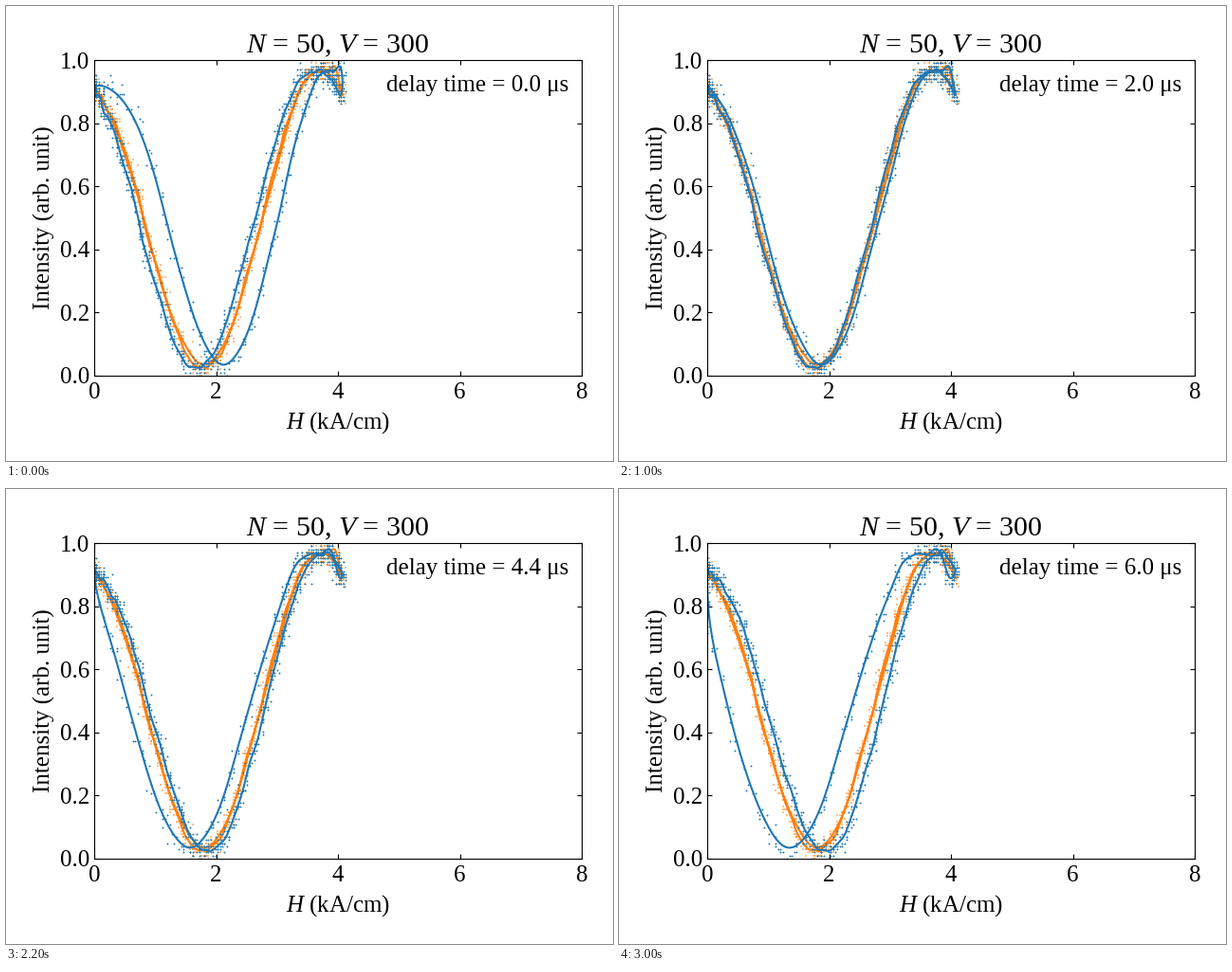
Recreate the animation shown at these times as a matplotlib script. Size 640 by 480 pixels, loop 3100 ms.

```python
import numpy as np
import matplotlib.pyplot as plt
from matplotlib.animation import FuncAnimation

W, H, DPI = 640, 480, 100
FRAMES, INTERVAL = 31, 100
DT = 0.2            # sampling step and delay step, in microseconds
MATCHED = 13        # delay step at which both branches coincide
H_MAX = 4.08
BLUE, ORANGE = "#1f77b4", "#ff7f0e"

plt.rcParams.update({
    "font.family": "Liberation Serif",
    "font.size": 18,
    "mathtext.fontset": "custom",
    "mathtext.rm": "Liberation Serif",
    "mathtext.it": "Liberation Serif:italic",
    "xtick.direction": "in",
    "ytick.direction": "in",
    "xtick.top": True,
    "ytick.right": True,
    "xtick.major.pad": 5.2,
})


def intensity(h):
    """Light through the cell: a squared sine around the dark field."""
    return .022 + (.885 + .017 * h) * np.sin(.83 * (h - 1.8)) ** 2


def crest(h):
    """Extra peak near the maximum, on the rising branch only."""
    return .065 * np.exp(-((h - 3.96) / .06) ** 2)


def rise_rate(h):
    """Fast capacitor discharge with a softened start."""
    return .012 + .155 * np.sqrt(1 - h / H_MAX) * (1 - .35 * np.exp(-h / .3))


def fall_rate(h):
    return .013 + .033 * np.clip(np.sin(np.pi * h / H_MAX), 0, 1) ** .6


def sweep(rate):
    """Field samples from 0 to the maximum at the given rate."""
    h = np.linspace(0, H_MAX, 1000)
    t = np.cumsum((h[1] - h[0]) / rate(h))
    return np.interp(np.arange(t[0], t[-1], DT), t, h)


def smooth(values):
    k = np.arange(-15, 16)
    kernel = np.exp(-0.5 * (k / 6) ** 2)
    return np.convolve(values, kernel / kernel.sum(), mode="same")


def quantise(values, step):
    return np.round(values / step) * step


rng = np.random.default_rng(7)
up, down = sweep(rise_rate), sweep(fall_rate)[::-1]
rest = np.zeros(80)
field = np.concatenate([rest, up, down, rest])
signal = np.concatenate([
    rest + .918,
    intensity(up) + crest(up),
    intensity(down),
    rest + .9,
])
n = len(field)
raw_h = quantise(field + rng.normal(0, .032, n), .0375)
raw_i = quantise(signal + rng.normal(0, .018, n), .0098)
line_h, line_i = smooth(raw_h), smooth(raw_i)


def shifted(h, i, step):
    """Pair each field sample with the intensity some samples later."""
    j = np.arange(30, n - 33)
    return h[j], i[j + step - MATCHED]


fig = plt.figure(figsize=(W / DPI, H / DPI), dpi=DPI, facecolor="white")
ax = fig.add_axes([93 / W, 1 - 390 / H, 514 / W, 333 / H])
ax.set(xlim=(0, 8), ylim=(0, 1), xticks=range(0, 9, 2),
       yticks=np.arange(6) / 5)
ax.set_title("$N$ = 50, $V$ = 300", pad=5.4)
ax.set_xlabel("$H$ (kA/cm)", labelpad=5.2)
ax.set_ylabel("Intensity (arb. unit)", labelpad=3.3)


def add_trace(color, edge, z):
    dots, = ax.plot([], [], "+", color=color, ms=2, mew=edge, zorder=z)
    line, = ax.plot([], [], color=color, lw=1.5, zorder=z + .1)
    return dots, line


def set_trace(trace, step):
    dots, line = trace
    dots.set_data(*shifted(raw_h, raw_i, step))
    line.set_data(*shifted(line_h, line_i, step))


fixed = add_trace(ORANGE, .35, 2.0)
moving = add_trace(BLUE, .65, 2.2)
set_trace(fixed, MATCHED)
label = ax.text(.6, .9, "", transform=ax.transAxes)


def draw(frame):
    set_trace(moving, frame)
    label.set_text(f"delay time = {frame * DT:.1f} μs")
    return (*moving, label)


anim = FuncAnimation(fig, draw, frames=FRAMES, interval=INTERVAL,
                     repeat=True, repeat_delay=0, blit=False)
plt.show()
```
